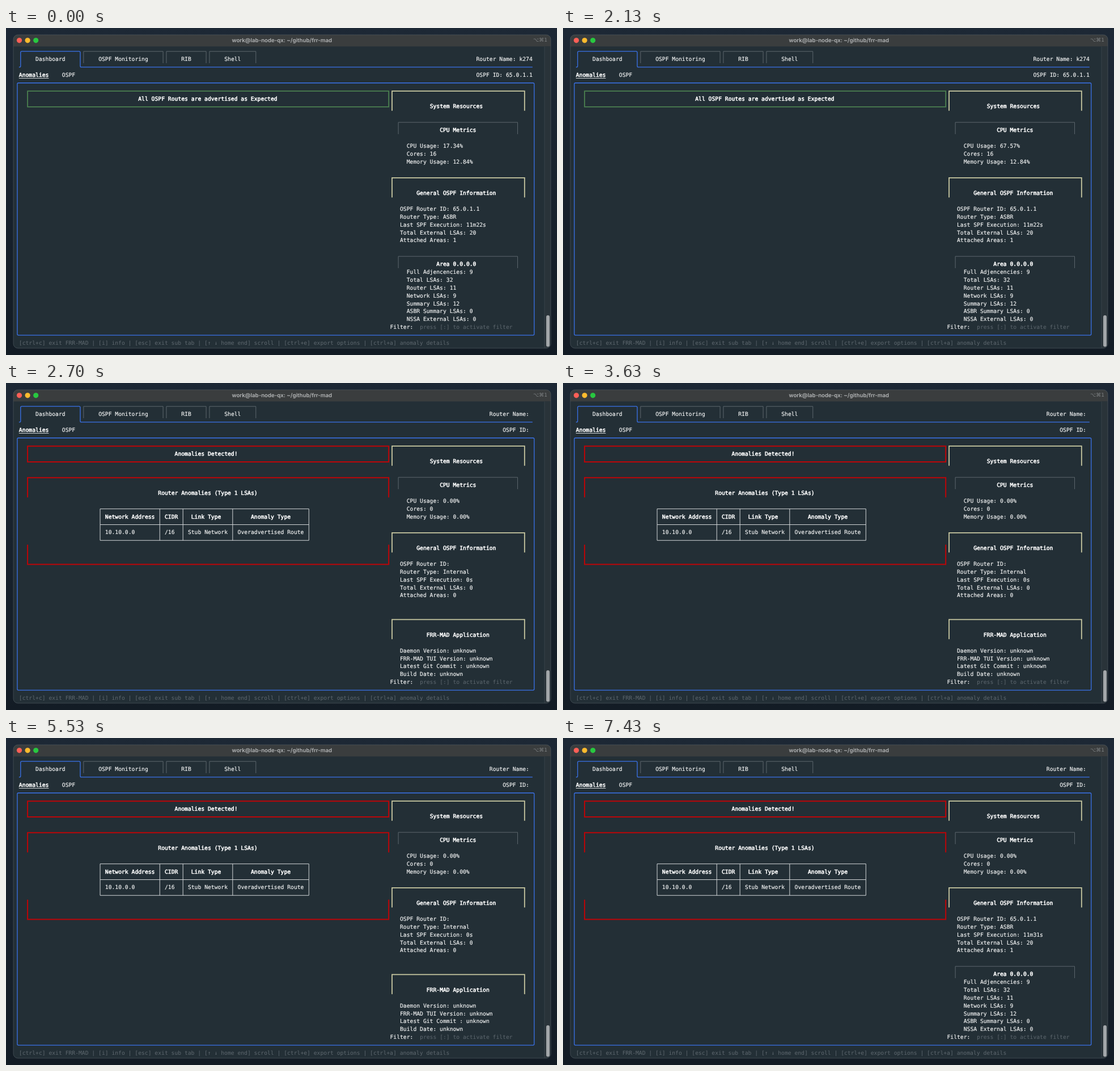
Animation, 972 px wide and 576 px high, one loop 8 s. Source, as an HTML page:

```html
<!DOCTYPE html>
<html lang="en">
<head>
<meta charset="utf-8">
<title>Terminal dashboard</title>
<style>
html, body { margin: 0; width: 100%; height: 100%; overflow: hidden; background: #18222d; }
svg { display: block; width: 972px; height: 576px; }
text { font: 9.71px "DejaVu Sans Mono", monospace; fill: #f4f5f5; stroke: #f4f5f5; stroke-width: .16; white-space: pre; text-rendering: geometricPrecision; }
.b { fill: #fff; stroke: #fff; stroke-width: .55; }
.dim { fill: #5e686f; stroke: none; }
.title { font: 600 9.7px Inter, sans-serif; fill: #b5b7b8; stroke: none; text-anchor: middle; }
.keys { font: 9px "DejaVu Sans", sans-serif; fill: #7d8183; stroke: none; }
path { fill: none; stroke-width: 1; }
.blue { stroke: #3a72ea; stroke-width: 1.3; }
.gray { stroke: #5d676d; }
.white { stroke: #d3d7d9; }
.thick { stroke-width: 2; transform: translate(.6px, .5px); }
.green { stroke: #4b8050; stroke-width: 1.8; }
.red { stroke: #bd0508; }
.cream { stroke: #c9c9a2; stroke-width: 1.8; }

/* hard cuts: 70, 2200 and 7200 of 8000 ms */
.first, .load, .ok, .bad, .lost, .back { animation: 8s step-end infinite; }
.first { animation-name: first; }
.load { animation-name: load; }
.ok { animation-name: ok; }
.bad { animation-name: bad; }
.lost { animation-name: lost; }
.back { animation-name: back; }
@keyframes first { 0% { opacity: 1 } .875%, 100% { opacity: 0 } }
@keyframes load { 0% { opacity: 0 } .875% { opacity: 1 } 27.5%, 100% { opacity: 0 } }
@keyframes ok { 0% { opacity: 1 } 27.5%, 100% { opacity: 0 } }
@keyframes bad { 0% { opacity: 0 } 27.5%, 100% { opacity: 1 } }
@keyframes lost { 0% { opacity: 0 } 27.5% { opacity: 1 } 90%, 100% { opacity: 0 } }
@keyframes back { 0% { opacity: 0 } 90%, 100% { opacity: 1 } }
</style>
</head>
<body>
<svg id="stage" viewBox="0 0 972 576">
  <defs>
    <linearGradient id="desk" x2="0" y2="1">
      <stop stop-color="#1d2835"/><stop offset="1" stop-color="#131c25"/>
    </linearGradient>
    <clipPath id="win"><rect x="13" y="12" width="948" height="552" rx="8"/></clipPath>
  </defs>
  <rect width="972" height="576" fill="url(#desk)"/>
  <g clip-path="url(#win)">
    <rect x="13" y="12" width="948" height="552" fill="#232f36"/>
    <rect x="13" y="12" width="948" height="20.5" fill="#3a3d3e"/>
    <rect x="950" y="32.5" width="11" height="532" fill="#293339"/>
    <rect x="949.5" y="32.5" width="1" height="532" fill="#39434a"/>
    <rect x="953" y="506" width="6" height="55.5" rx="3" fill="#a2a6a9"/>
  </g>
  <rect x="13" y="12" width="948" height="552" rx="8" fill="none" stroke="#566067" stroke-opacity=".6"/>
  <circle cx="23.5" cy="21.8" r="4.6" fill="#fe5f57"/>
  <circle cx="38.1" cy="21.8" r="4.6" fill="#febb2e"/>
  <circle cx="52.7" cy="21.8" r="4.6" fill="#28c840"/>
  <text class="title" x="486.8" y="24.8">work@lab-node-qx: ~/github/frr-mad</text>
  <text class="keys" x="930" y="24.2">⌥⌘1</text>
</svg>
<script>
const stage = document.getElementById('stage');
const colX = c => 17 + 5.845 * c;
const midX = c => colX(c + .5);
const rowY = r => 41.2 + 13.885 * r;

function add(parent, tag, attrs) {
  const el = document.createElementNS('http://www.w3.org/2000/svg', tag);
  for (const k in attrs) el.setAttribute(k, attrs[k]);
  return parent.appendChild(el);
}
const group = cls => add(stage, 'g', { class: cls });
const text = (g, c, r, s, cls = '') =>
  add(g, 'text', { x: colX(c), y: rowY(r) + 3, class: cls }).textContent = s;
const lines = (g, c, r, list) => list.forEach((s, i) => text(g, c, r + i, s));
const path = (g, cls, d) => add(g, 'path', { class: cls, d });
const box = (g, cls, c1, r1, c2, r2) =>
  path(g, cls, `M${midX(c1)} ${rowY(r1)}H${midX(c2)}V${rowY(r2)}H${midX(c1)}Z`);
// three-sided frame, open at row r2
const cap = (g, cls, c1, r1, c2, r2) =>
  path(g, cls, `M${midX(c1)} ${rowY(r2)}V${rowY(r1)}H${midX(c2)}V${rowY(r2)}`);

const base = group('base'), ok = group('ok'), bad = group('bad');
const lost = group('lost'), back = group('back');

// tabs and outer frame
const [l, r, t, b] = [midX(1), midX(19), rowY(0), rowY(2)];
path(base, 'blue', `M${colX(1)} ${b}H${l - 2}Q${l} ${b} ${l} ${b - 2}V${t + 2}Q${l} ${t} ${l + 2} ${t}` +
  `H${r - 2}Q${r} ${t} ${r} ${t + 2}V${b - 2}Q${r} ${b} ${r + 2} ${b}H${colX(156)}`);
add(base, 'rect', { class: 'blue', fill: 'none', rx: 2, x: midX(0), y: rowY(4),
  width: midX(156) - midX(0), height: rowY(36) - rowY(4) });
[[20, 44], [45, 57], [58, 72]].forEach(([a, z]) => cap(base, 'gray', a, 0, z, 1.5));
text(base, 6, 1, 'Dashboard');
text(base, 25, 1, 'OSPF Monitoring');
text(base, 50, 1, 'RIB');
text(base, 63, 1, 'Shell');
text(base, 1, 3, 'Anomalies', 'b');
path(base, 'white', `M${colX(1)} 88.5H${colX(10)}`);
text(base, 14, 3, 'OSPF');
text(base, 1, 37, '[ctrl+c] exit FRR-MAD | [i] info | [esc] exit sub tab | [↑ ↓ home end] scroll | [ctrl+e] export options | [ctrl+a] anomaly details', 'dim');

// side panel
cap(base, 'thick cream', 113, 5, 153, 7.5);
text(base, 125, 7, 'System Resources', 'b');
cap(base, 'gray', 115, 9, 151, 10.5);
text(base, 128, 10, 'CPU Metrics', 'b');
cap(base, 'thick cream', 113, 16, 153, 18.5);
text(base, 121, 18, 'General OSPF Information', 'b');
text(base, 113, 35, 'Filter:');
text(base, 122, 35, 'press [:] to activate filter', 'dim');

// healthy
lines(ok, 118, 13, ['Cores: 16', 'Memory Usage: 12.84%']);
text(group('first'), 118, 12, 'CPU Usage: 17.34%');
text(group('load'), 118, 12, 'CPU Usage: 67.57%');
text(ok, 139, 1, 'Router Name: k274');
text(ok, 139, 3, 'OSPF ID: 65.0.1.1');
box(ok, 'thick green', 3, 5, 112, 7);
text(ok, 37, 6, 'All OSPF Routes are advertised as Expected', 'b');

// anomaly
lines(bad, 118, 12, ['CPU Usage: 0.00%', 'Cores: 0', 'Memory Usage: 0.00%']);
text(bad, 143, 1, 'Router Name:');
text(bad, 147, 3, 'OSPF ID:');
box(bad, 'thick red', 3, 5, 112, 7);
text(bad, 48, 6, 'Anomalies Detected!', 'b');
cap(bad, 'thick red', 3, 9, 112, 11.5);
cap(bad, 'thick red', 3, 20, 112, 17.5);
text(bad, 43, 11, 'Router Anomalies (Type 1 LSAs)', 'b');
box(bad, 'white', 25, 13, 88, 17);
path(bad, 'white', `M${midX(25)} ${rowY(15)}H${midX(88)}` +
  [43, 50, 65].map(c => `M${midX(c)} ${rowY(13)}V${rowY(17)}`).join(''));
[[27, 'Network Address'], [45, 'CIDR'], [53, 'Link Type'], [71, 'Anomaly Type']]
  .forEach(([c, s]) => text(bad, c, 14, s, 'b'));
[[27, '10.10.0.0'], [45, '/16'], [52, 'Stub Network'], [67, 'Overadvertised Route']]
  .forEach(([c, s]) => text(bad, c, 16, s));

function routerInfo(g, age) {
  lines(g, 116, 20, ['OSPF Router ID: 65.0.1.1', 'Router Type: ASBR',
    'Last SPF Execution: ' + age, 'Total External LSAs: 20', 'Attached Areas: 1']);
  cap(g, 'gray', 115, 26, 151, 27.5);
  text(g, 127, 27, 'Area 0.0.0.0', 'b');
  lines(g, 118, 28, ['Full Adjencencies: 9', 'Total LSAs: 32', 'Router LSAs: 11',
    'Network LSAs: 9', 'Summary LSAs: 12', 'ASBR Summary LSAs: 0', 'NSSA External LSAs: 0']);
}
routerInfo(ok, '11m22s');
routerInfo(back, '11m31s');

lines(lost, 116, 20, ['OSPF Router ID:', 'Router Type: Internal', 'Last SPF Execution: 0s',
  'Total External LSAs: 0', 'Attached Areas: 0']);
cap(lost, 'thick cream', 113, 27, 153, 29.5);
text(lost, 124, 29, 'FRR-MAD Application', 'b');
lines(lost, 116, 31, ['Daemon Version: unknown', 'FRR-MAD TUI Version: unknown',
  'Latest Git Commit : unknown', 'Build Date: unknown']);
</script>
</body>
</html>
```
